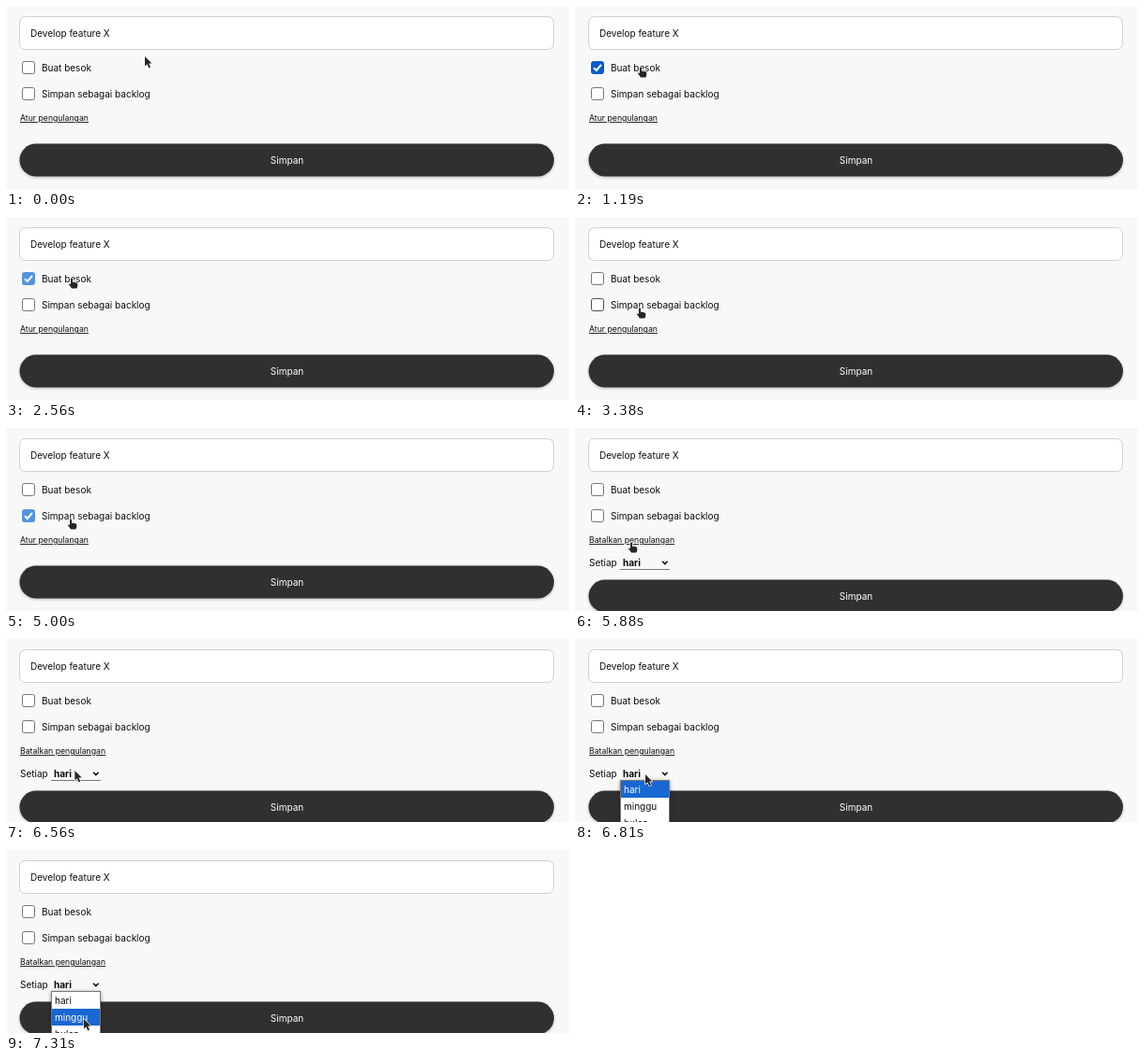
An HTML page that plays this animation: 600x196 px, repeating every 8000 ms.

```html
<!DOCTYPE html>
<html lang="id">
<head>
<meta charset="utf-8">
<title>Task form</title>
<style>
  html, body { margin: 0; width: 100%; height: 100%; overflow: hidden; background: #f8f8f8; }
  svg { display: block; }
  text { font: 10px Inter, "Open Sans", sans-serif; fill: #0c0c0c; }
  #link { font-size: 8.7px; }
  #button text { fill: #fff; text-anchor: middle; }
  .shadow { filter: drop-shadow(0 1px 1.5px #0004); }
  #popup > rect:first-child { filter: drop-shadow(0 1px 2px #0006); }
  #cursor path { fill: #262626; stroke: #fff; stroke-width: 1.2; paint-order: stroke; stroke-linejoin: round; }
</style>
</head>
<body>
<svg width="600" height="196" viewBox="0 0 600 196">
  <rect x="14.5" y="11.5" width="569" height="35" rx="6" fill="#fff" stroke="#d0d0d0"/>
  <text x="26" y="33">Develop feature X</text>

  <g class="check" transform="translate(17 59)">
    <rect x=".5" y=".5" width="13" height="13" rx="2"/>
    <path d="M3 7.2 5.8 10 11 3.8" fill="none" stroke="#fff" stroke-width="2"/>
    <text x="21" y="11">Buat besok</text>
  </g>
  <g class="check" transform="translate(17 87)">
    <rect x=".5" y=".5" width="13" height="13" rx="2"/>
    <path d="M3 7.2 5.8 10 11 3.8" fill="none" stroke="#fff" stroke-width="2"/>
    <text x="21" y="11">Simpan sebagai backlog</text>
  </g>

  <text id="link" x="15" y="123" text-decoration="underline"></text>

  <g id="repeat">
    <text x="15" y="147.5">Setiap</text>
    <text x="51" y="147.5" font-weight="700" style="font-weight:700">hari</text>
    <path d="M93 142.8l2.8 2.8 2.8-2.8" fill="none" stroke="#111" stroke-width="1.6"/>
    <path d="M48 151.5h53" stroke="#777"/>
  </g>

  <g id="button">
    <rect class="shadow" x="14.5" y="147.5" width="569.5" height="35" rx="17.5" fill="#303030"/>
    <text x="299.5" y="168.5">Simpan</text>
  </g>

  <g id="popup">
    <rect x="48.5" y="151.5" width="52" height="56" fill="#fff" stroke="#777"/>
    <rect id="mark" x="49" width="51" height="18" fill="#1967d2"/>
    <text class="option" x="52" y="164.5">hari</text>
    <text class="option" x="52" y="183">minggu</text>
    <text class="option" x="52" y="201">bulan</text>
  </g>

  <g id="cursor">
    <path id="arrow" d="M0 0V10.5L2.4 8.3 4.2 12.4 6 11.6 4.2 7.6H7.5Z"/>
    <path id="hand" d="M-1 1Q0-.6 1 1V5Q2 4 3 5 4 4.3 4.8 5.6 6 5 6.3 6.5V8.5Q6.3 10 5.3 11.5H0Q-1.5 9-3.3 7-2.5 5.8-1 7Z"/>
  </g>
</svg>
<script>
const LOOP = 8000, STEP = 62.5;
const $ = id => document.getElementById(id);
const checks = [...document.querySelectorAll('.check')];
const options = [...document.querySelectorAll('.option')];

// Curved cursor moves, in steps: start, end, control point, end point
const moves = [
  [1, 10, 110, 53, 70, 65],
  [42, 50, 92, 98, 61, 110],
  [53, 54, 65, 103, 69, 97],
  [83, 89, 90, 112, 60, 122],
  [99, 107, 70, 132, 75, 145],
  [109, 117, 79, 162, 83, 181],
];
// Steps of each box: press, check, press again, uncheck
const clicks = [[18, 19, 41, 42], [58, 60, 80, 81]];

function cursorAt(k) {
  let x = 148, y = 54;
  for (const [start, end, cx, cy, ex, ey] of moves) {
    if (k <= start) break;
    const p = Math.min(1, (k - start) / (end - start));
    const e = p * p * (3 - 2 * p);
    const curve = (a, b, c) => (1 - e) ** 2 * a + 2 * e * (1 - e) * b + e * e * c;
    [x, y] = [curve(x, cx, ex), curve(y, cy, ey)];
  }
  return [x, y];
}

function show(el, on) {
  el.style.display = on ? '' : 'none';
}

function drawCheck(i, k, hover) {
  const [press, check, release, clear] = clicks[i];
  const box = checks[i].querySelector('rect');
  const checked = k >= check && k < clear;
  const pressed = (k >= press && k < check) || (k >= release && k < clear);
  const blue = pressed ? '#5394df' : hover ? '#0b5bcb' : '#0d66d8';
  box.setAttribute('fill', checked ? blue : '#fff');
  box.setAttribute('stroke', checked ? blue : pressed ? '#8d8d8d' : hover ? '#4f4f4f' : '#767676');
  show(checks[i].querySelector('path'), checked);
}

function draw(t) {
  const k = Math.floor((t + 5) / STEP);
  const [x, y] = cursorAt(k);
  const over = (right, top, bottom) => x >= 15 && x <= right && y >= top && y <= bottom;
  const open = k >= 94, popup = k >= 109;
  const hovers = [over(92, 59, 74), over(154, 87, 102)];
  hovers.forEach((hover, i) => drawCheck(i, k, hover));

  $('link').textContent = open ? 'Batalkan pengulangan' : 'Atur pengulangan';
  show($('repeat'), open);
  $('button').setAttribute('transform', `translate(0 ${open ? 15 : 0})`);

  const selected = y >= 170 ? 1 : 0;
  show($('popup'), popup);
  $('mark').setAttribute('y', 152 + 18 * selected);
  options.forEach((o, i) => o.style.fill = i === selected ? '#fff' : '#0c0c0c');

  const link = over(open ? 106 : 89, 115, 127);
  const hand = link || hovers.includes(true);
  show($('hand'), hand);
  show($('arrow'), !hand);
  $('cursor').setAttribute('transform', `translate(${x} ${y})`);
}

function tick() {
  draw(performance.now() % LOOP);
  requestAnimationFrame(tick);
}
tick();
</script>
</body>
</html>
```
